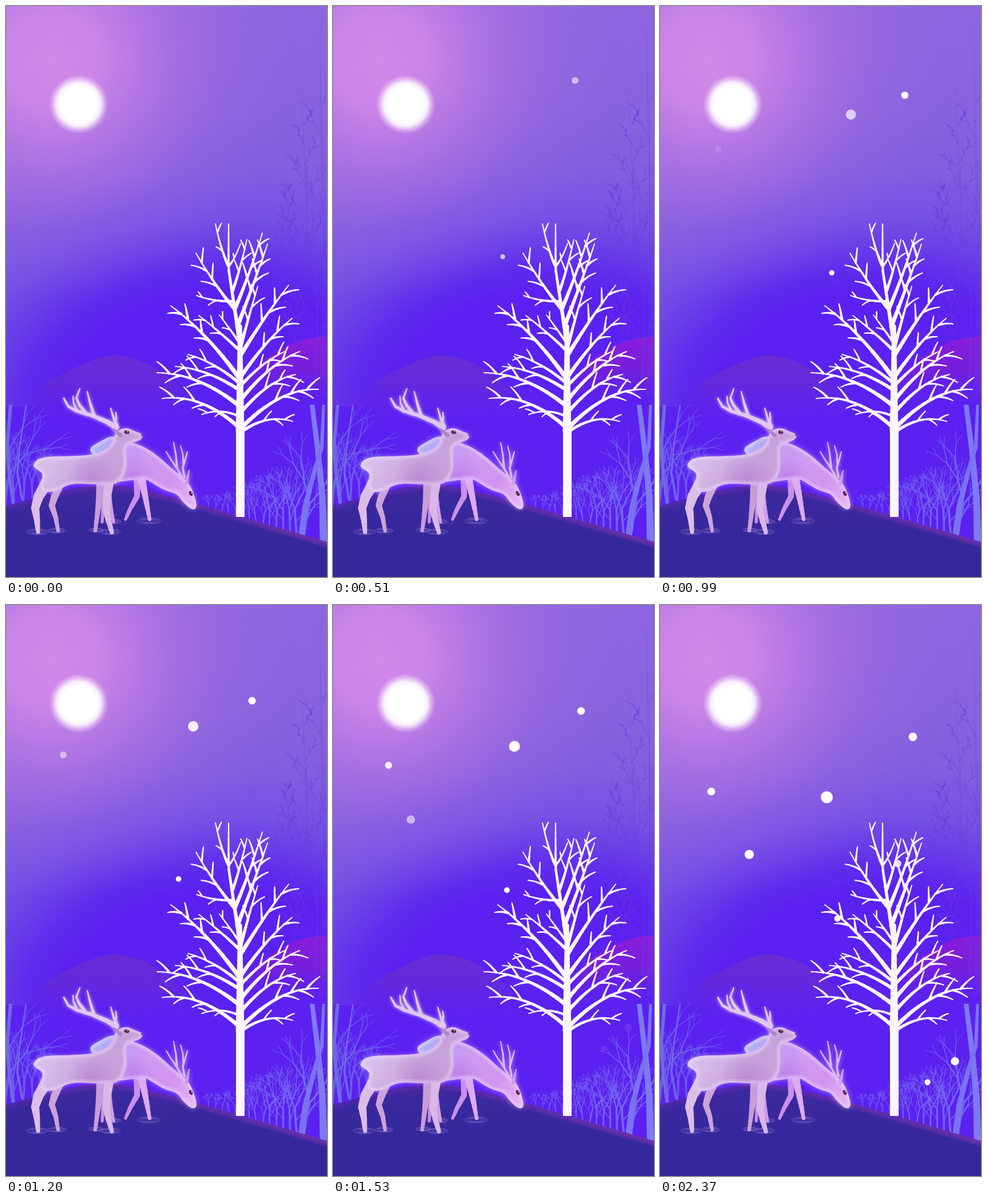
An HTML page with a canvas for the animation above (2.4 s loop, 561x998 px).

```html
<!DOCTYPE html>
<html lang="en">
<head>
<meta charset="utf-8">
<title>Winter deer</title>
<style>
html, body { margin: 0; width: 100%; height: 100%; overflow: hidden; background: #5b21f0; }
canvas { display: block; width: 561px; height: 998px; }
</style>
</head>
<body>
<canvas id="stage" width="561" height="998"></canvas>
<script>
const W = 561, H = 998, LOOP = 2400, STEP = 30;
const stage = document.getElementById('stage').getContext('2d');
const scene = document.createElement('canvas');
scene.width = W;
scene.height = H;
const c = scene.getContext('2d');

const lerp = (a, b, s) => a + (b - a) * s;
const points = text => text.split(' ').map(p => p.split(',').map(Number));
const groundY = x => 837 + 0.3 * (Math.hypot(x - 173, 60) - 60);

let seed = 7;
function rand(lo = 0, hi = 1) {
  seed = (seed * 16807) % 2147483647;
  return lerp(lo, hi, seed / 2147483647);
}

function withStops(gradient, stops) {
  for (const [at, color] of stops) gradient.addColorStop(at, color);
  return gradient;
}
const linear = (x0, y0, x1, y1, ...stops) => withStops(c.createLinearGradient(x0, y0, x1, y1), stops);
const radial = (x, y, r, ...stops) => withStops(c.createRadialGradient(x, y, 0, x, y, r), stops);

// Closed outline that runs smoothly through the midpoints of its corners.
function blob(text) {
  const p = points(text), n = p.length, path = new Path2D();
  const mid = i => [0, 1].map(d => (p[i % n][d] + p[(i + 1) % n][d]) / 2);
  path.moveTo(...mid(0));
  for (let i = 1; i <= n; i++) path.quadraticCurveTo(...p[i % n], ...mid(i));
  path.closePath();
  return path;
}

// Strokes the curve at(0..1) with a width running from w0 to w1.
function taper(at, w0, w1, color, cuts = 16) {
  c.strokeStyle = color;
  for (let i = 0; i < cuts; i++) {
    c.lineWidth = lerp(w0, w1, (i + 0.5) / cuts);
    c.beginPath();
    c.moveTo(...at(i / cuts));
    c.lineTo(...at((i + 1) / cuts));
    c.stroke();
  }
}

function limb(text, w0, w1, color) {
  const p = points(text), n = p.length - 1;
  taper(s => {
    const i = Math.min(n - 1, Math.floor(s * n));
    return [0, 1].map(d => lerp(p[i][d], p[i + 1][d], s * n - i));
  }, w0, w1, color, n * 4);
}

// Curved branch with twigs that fork off on alternate sides.
function bough(x0, y0, x1, y1, w, bow, color, twigs) {
  const len = Math.hypot(x1 - x0, y1 - y0);
  const cx = (x0 + x1) / 2, cy = (y0 + y1) / 2 - 2 * bow * len;
  const at = s => [lerp(lerp(x0, cx, s), lerp(cx, x1, s), s), lerp(lerp(y0, cy, s), lerp(cy, y1, s), s)];
  taper(at, w, 1.8, color);
  for (let i = 0; i < twigs; i++) {
    const s = lerp(0.45, 0.85, i / Math.max(1, twigs - 1));
    const [x, y] = at(s), [nx, ny] = at(s + 0.05);
    const a = Math.atan2(ny - y, nx - x) + (i % 2 ? 0.65 : -0.65);
    const size = Math.min(30, len * 0.24) * rand(0.7, 1.1);
    bough(x, y, x + size * Math.cos(a), y + size * Math.sin(a), Math.max(2, w * 0.55), 0.06, color, 0);
  }
}

function dot(ctx, x, y, r, color) {
  ctx.fillStyle = color;
  ctx.beginPath();
  ctx.arc(x, y, r, 0, 7);
  ctx.fill();
}

function sky() {
  c.fillStyle = '#5b21f0';
  c.fillRect(0, 0, W, H);
  c.save();
  c.translate(380, 700);
  c.scale(1.45, 1);
  c.fillStyle = radial(0, 0, 800, [0.25, '#5b21f0'], [0.3, '#602bed'], [0.35, '#693de8'],
    [0.41, '#744fe4'], [0.52, '#815edf'], [0.64, '#8863de'], [1, '#9068df']);
  c.fillRect(-400, -700, 800, 700);
  c.restore();
  c.fillStyle = radial(80, 95, 420, [0, 'rgba(210,138,233,1)'], [0.2, 'rgba(207,135,232,.93)'],
    [0.42, 'rgba(196,126,230,.62)'], [0.7, 'rgba(180,115,226,.22)'], [1, 'rgba(170,110,225,0)']);
  c.fillRect(0, 0, W, H);
  c.fillStyle = radial(127, 172, 52, [0, '#fff'], [0.6, '#fff'], [0.74, 'rgba(255,255,255,.85)'],
    [0.86, 'rgba(255,245,255,.42)'], [1, 'rgba(255,230,255,0)']);
  c.fillRect(70, 115, 115, 115);
}

function hills() {
  c.fillStyle = linear(0, 608, 0, 735, [0, '#6a2dd5'], [0.4, '#632add'], [1, 'rgba(91,33,240,0)']);
  c.fill(blob('0,730 70,657 130,627 180,609 208,612 252,626 295,655 360,730'));
  c.fillStyle = linear(0, 578, 0, 705, [0, '#8a1cdb'], [0.45, '#761fdc'], [1, 'rgba(91,33,240,0)']);
  c.fill(blob('410,700 425,637 475,601 525,579 600,577 600,705'));
}

function grow(x, y, angle, len, w, depth) {
  const bend = angle + rand(-0.2, 0.2);
  const mx = x + Math.sin(angle) * len / 2, my = y - Math.cos(angle) * len / 2;
  const ex = mx + Math.sin(bend) * len / 2, ey = my - Math.cos(bend) * len / 2;
  c.lineWidth = w;
  c.beginPath();
  c.moveTo(x, y);
  c.quadraticCurveTo(mx, my, ex, ey);
  c.stroke();
  if (!depth) return;
  const next = Math.max(0.8, w * 0.66);
  for (const side of [-1, 1]) grow(ex, ey, bend + side * rand(0.12, 0.55), len * rand(0.64, 0.84), next, depth - 1);
  if (depth > 2) grow(mx, my, angle + rand(-0.9, 0.9), len * 0.5, next * 0.7, depth - 2);
}

// Tall faint tree with steep side branches.
function spire(x, base, top) {
  const color = 'rgba(112,64,222,.2)', height = base - top;
  taper(s => [x + 4 * Math.sin(5 * s), lerp(base, top, s)], height / 55, 1, color);
  for (let i = 1; i < 9; i++) {
    const y = lerp(base, top, i / 10), side = i % 2 ? -1 : 1, size = height * 0.2 * (1.1 - i / 10);
    bough(x, y, x + side * size * 0.6, y - size * 1.3, 2.5, -0.05, color, 3);
  }
}

function farTrees() {
  spire(553, 680, 40);
  spire(522, 480, 140);
  spire(492, 460, 290);
  spire(505, 590, 440);
  spire(540, 660, 330);
}

function grove(x0, x1, count, size0, size1, color) {
  c.strokeStyle = color;
  for (let i = 0; i < count; i++) {
    const s = i / (count - 1), x = lerp(x0, x1, s), size = lerp(size0, size1, Math.sqrt(s));
    grow(x, groundY(x) + 3, rand(-0.12, 0.14), size, size * 0.085, size > 20 ? 4 : 3);
  }
}

function sideTrees() {
  c.save();
  c.beginPath();
  c.rect(0, 697, W, 250);
  c.clip();
  grove(-2, 78, 6, 58, 26, '#6a5eea');
  limb('12,868 5,815 2,770 8,697', 5, 6, '#7068e8');
  limb('28,862 20,815 24,770 35,697', 4, 2, '#7068e8');
  grove(520, 354, 15, 58, 9, '#7366ee');
  limb('555,938 553,860 546,785 535,697', 13, 8, '#7f79f5');
  limb('517,922 523,875 537,820 552,770 555,697', 11, 5, '#7973f0');
  c.restore();
}

function ground() {
  const top = new Path2D();
  for (let x = -20; x <= W + 20; x += 10) top.lineTo(x, groundY(x));
  const area = new Path2D(top);
  area.lineTo(W + 20, H);
  area.lineTo(-20, H);
  c.fillStyle = linear(0, 838, 0, 940, [0, '#3d289e'], [1, '#34289b']);
  c.fill(area);
  c.save();
  c.clip(area);
  c.strokeStyle = linear(0, 0, W, 0, [0, 'rgba(90,40,180,.13)'], [1, 'rgba(125,50,175,.2)']);
  for (let w = 3; w <= 21; w += 3) {
    c.lineWidth = w;
    c.stroke(top);
  }
  c.restore();
}

function whiteTree() {
  const white = '#faf7fc';
  const stemX = y => 409 - 20 * Math.min(1, Math.max(0, (590 - y) / 130));
  c.fillStyle = white;
  c.fillRect(402, 738, 15, 155);
  taper(s => [409, lerp(745, 560, s)], 15, 7, white);
  taper(s => { const y = lerp(600, 381, s); return [stemX(y), y]; }, 8, 2, white);
  // Root height on the stem, then the tip.
  const boughs = points('738,273,686 718,342,714 700,264,641 672,296,630 660,318,609 652,288,524 603,337,541 '
    + '590,373,540 530,332,432 516,333,506 455,366,381 740,546,670 746,501,726 712,506,644 690,513,604 '
    + '665,487,604 650,500,546 612,494,488 600,440,490 560,457,416 530,448,397 500,421,408 455,410,415');
  for (const [root, x, y] of boughs) {
    const len = Math.hypot(x - 405, y - root);
    bough(stemX(root), root, x, y, 2.5 + len / 30, (root - 580) / 1300, white, Math.round(len / 34));
  }
}

function ripple(x, y, r) {
  c.strokeStyle = 'rgba(200,170,235,.5)';
  c.lineWidth = 0.7;
  for (const k of [0.5, 0.78, 1]) {
    c.beginPath();
    c.ellipse(x, y, r * k, r * k * 0.26, 0, 0, 7);
    c.stroke();
  }
}

function glow(size) {
  c.shadowColor = 'rgba(225,200,255,.6)';
  c.shadowBlur = size;
}

// Filled body with a bright rim and a soft shadow.
function body(shape, fill, x, y, r, shadow) {
  c.fillStyle = fill;
  c.fill(shape);
  c.save();
  c.clip(shape);
  c.shadowBlur = 0;
  c.fillStyle = radial(x, y, r, [0, shadow], [1, 'rgba(180,120,215,0)']);
  c.fillRect(x - r, y - r, 2 * r, 2 * r);
  c.strokeStyle = 'rgba(240,222,252,.13)';
  for (let w = 2; w <= 14; w += 3) {
    c.lineWidth = w;
    c.stroke(shape);
  }
  c.restore();
}

function eye(x, y, tilt) {
  c.shadowBlur = 0;
  c.fillStyle = '#512153';
  c.beginPath();
  c.ellipse(x, y, 4.5, 2.8, tilt, 0, 7);
  c.fill();
  dot(c, x + 1, y - 1, 0.9, '#e8c8f0');
}

function doe() {
  c.save();
  limb('171,840 170,875 168,902', 9, 5, '#c68de8');
  limb('178,840 183,877 188,902', 9, 5, '#d49aec');
  limb('229,822 229,857 217,879 209,897', 12, 5, '#c990ea');
  limb('236,822 244,860 251,897', 14, 6, '#dbaaf0');
  glow(8);
  body(blob('143,774 165,761 186,750 208,759 237,768 264,785 290,809 314,828 325,843 335,875 326,882 308,866 299,852 278,847 258,835 244,826 222,828 165,836 158,790'),
    linear(145, 765, 330, 865, [0, '#a9c0fb'], [0.2, '#bb9bf3'], [0.5, '#d09af3'], [0.75, '#d193f0'], [1, '#e6b2f3']),
    222, 826, 42, 'rgba(180,105,232,.6)');
  limb('308,825 299,808 289,794 280,779', 4, 2, '#dab8f3');
  limb('299,808 297,785 293,763', 4, 2, '#dab8f3');
  limb('312,824 309,807 314,790 317,779', 4, 2, '#dab8f3');
  limb('310,804 309,783 305,769', 3, 2, '#dab8f3');
  limb('315,835 320,812', 6, 2, '#cf9bea');
  eye(323, 852, 1.1);
  c.restore();
}

function buck() {
  const horn = '#e0caee';
  c.save();
  limb('97,830 85,857 80,873 87,894 91,917', 15, 6, '#cba2d9');
  limb('165,828 163,862 160,886 156,917', 14, 6, '#c79dd7');
  limb('72,832 57,857 51,877 54,897 56,919', 21, 7, '#dcbde8');
  limb('181,826 177,855 175,880 180,902 185,920', 17, 7, '#d9b7e6');
  glow(6);
  body(blob('45,803 60,788 110,787 150,785 174,777 187,764 189,751 198,740 212,737 226,744 239,748 237,758 221,763 211,768 208,779 211,803 204,826 189,837 162,836 112,834 92,846 70,851 59,840 66,818 56,811'),
    linear(45, 740, 200, 850, [0, '#d9d0f6'], [0.35, '#d6bae8'], [0.7, '#c7a2da'], [1, '#c89fd9']),
    150, 830, 48, 'rgba(172,118,200,.55)');
  limb('193,737 177,727 151,716 124,708 109,700 101,686', 9, 3, horn);
  limb('124,706 118,694 117,682', 4, 2, horn);
  limb('139,711 128,697 123,685 129,669', 6, 2, horn);
  limb('154,716 147,694 142,674', 6, 2, horn);
  limb('195,736 188,720 183,703', 6, 2, horn);
  limb('190,731 193,720 192,710', 4, 2, horn);
  limb('200,750 188,740', 8, 3, '#ad82c1');
  eye(211, 745, 0.15);
  dot(c, 237, 750, 1.6, '#805483');
  c.restore();
}

function paintScene() {
  c.lineCap = c.lineJoin = 'round';
  sky();
  hills();
  farTrees();
  sideTrees();
  ground();
  whiteTree();
  for (const [x, y, r] of points('55,919,19 89,917,16 158,916,13 182,919,18 186,901,15 250,900,20')) ripple(x, y, r);
  doe();
  buck();
}

// Position and radius belong to the last step of the loop; speeds are per second.
const FADE = 900;
const flakes = [
  { x: 442, y: 230.5, vx: 10.2, vy: 54, r: 7.4, from: 200 },
  { x: 310, y: 548, vx: 7.2, vy: 59.1, r: 5.5, from: 100 },
  { x: 291.5, y: 336, vx: -30.5, vy: 106, r: 10.5, from: 600 },
  { x: 89.5, y: 326, vx: -9, vy: 54.7, r: 6.8, from: 930 },
  { x: 156, y: 436, vx: 23.8, vy: 72.6, r: 8.1, from: 1230 },
  { x: 515.5, y: 797.5, vx: -0.5, vy: 70.6, r: 7.2, from: 1490 },
  { x: 467.5, y: 834, vx: -6.5, vy: 70, r: 5.2, from: 1490 },
  { x: 415.5, y: 452, vx: -30, vy: 42, r: 6.4, from: 1880 }
];

function frame(now) {
  const t = Math.floor((now % LOOP) / STEP) * STEP;
  const left = (LOOP - STEP - t) / 1000;
  stage.drawImage(scene, 0, 0);
  for (const f of flakes) {
    const u = Math.min(1, (t - f.from) / FADE);
    if (u <= 0) continue;
    const alpha = 1 - (1 - u) ** 2;
    dot(stage, f.x - f.vx * left, f.y - f.vy * left, f.r * (1 - 0.11 * left), `rgba(255,255,255,${alpha})`);
  }
  requestAnimationFrame(frame);
}

paintScene();
frame(performance.now());
</script>
</body>
</html>
```
